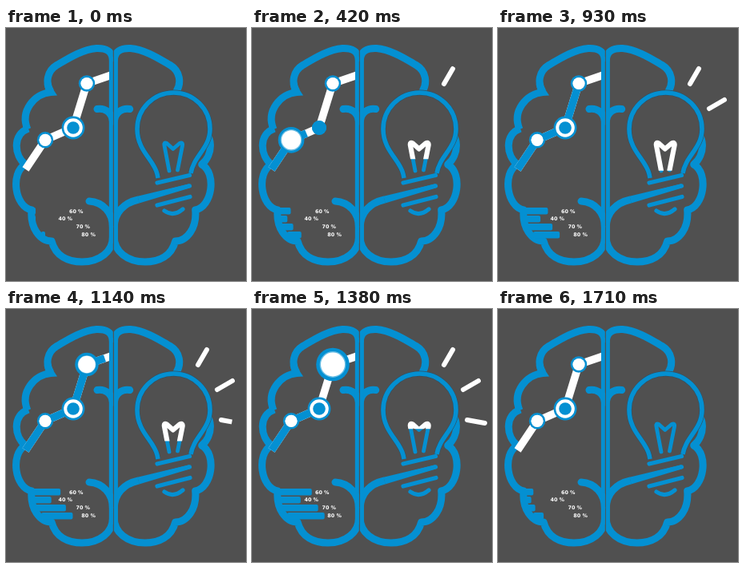
An HTML page for the animation above (1740 ms loop, 300 by 317 pixels).

```html
<!DOCTYPE html>
<html lang="en">
<head>
<meta charset="utf-8">
<title>Brain and bulb</title>
<style>
  html, body { margin: 0; width: 100%; height: 100%; overflow: hidden; background: #505050; }
  svg { display: block; width: 100vw; height: 100vh; }
  .line { fill: none; stroke: #0490d2; stroke-width: 9; stroke-linejoin: round; }
  .round { stroke-linecap: round; }
  .sharp { stroke-linejoin: miter; }
  .thin { stroke-width: 5.2; }
  .white { stroke: #fff; }
  .edge { stroke: #34505f; stroke-width: 6.8; }
  .blue { fill: #0490d2; }
  text { font: 700 6.4px "DejaVu Sans", Inter, sans-serif; fill: #fff; }
</style>
</head>
<body>
<svg viewBox="0 0 300 317">
  <defs>
    <clipPath id="half"><rect width="133.8" height="317"/></clipPath>
    <clipPath id="trendClip"><rect width="129" height="317"/></clipPath>
    <clipPath id="glowClip"><rect id="glow" x="185" y="130" width="50" height="0"/></clipPath>
    <g id="lobes" class="line">
      <path d="M133.500 42C133.500 29 125 25 113 25.500C95 27 78 38 63.500 46.500C51 54 49 69 56 80"/>
      <path d="M28 126C8 133 10 159 24 171C5 182 11 224 32 228C30 250 42 267 57 267C62 286 78 293 95 293C117 293 133.500 280 133.500 262V248"/>
      <path class="round" d="M114 101.500C123 100 132 105 133.500 117"/>
      <path class="thin" d="M131.400 36V270"/>
    </g>
    <path id="filament" d="M204 179L198 147.500Q197 142.500 201 144.500L208.800 151.500L217 144.500Q221.500 142.500 220.500 147.500L214.500 178"/>
    <path id="bulb" d="M190 188L189 183C185 165 164 154 164 126.500A45.500 45.500 0 0 1 255 126.500C255 151 234.500 160 231 182"/>
  </defs>

  <g clip-path="url(#half)">
    <use href="#lobes"/>
    <g class="line">
      <path class="sharp" d="M52 70Q53 76 56 80.500C36 82 17 104 27 127"/>
      <path class="round" d="M133.500 250C133.500 231 121 218 104 217"/>
    </g>
  </g>
  <g transform="translate(268.7) scale(-1 1)">
    <g clip-path="url(#half)">
      <use href="#lobes"/>
      <path class="line" d="M133.500 250C133.500 231 121 219 103 215"/>
    </g>
  </g>
  <g clip-path="url(#trendClip)" id="trend"></g>

  <use href="#bulb" class="line edge" style="fill:#505050"/>
  <use href="#bulb" class="line" style="stroke-width:5.6"/>
  <path class="blue" d="M164.500 210.700L229 195.300L230.500 200.300L166.500 219.500Z"/>
  <g class="line round thin">
    <path d="M189 194L229.500 184.500M190 208L229.500 197.800M189 222L230 211.500M198 229Q209 237 221 227"/>
    <use href="#filament" style="stroke-width:4.800"/>
  </g>
  <g clip-path="url(#glowClip)">
    <use href="#filament" class="line round white" style="stroke-width:6.200"/>
  </g>

  <g id="rays"></g>
  <g id="bars" class="blue"></g>
  <g id="nodes"></g>
  <text x="79" y="232">60 %</text>
  <text x="65.500" y="241.300">40 %</text>
  <text x="87.500" y="251.300">70 %</text>
  <text x="94.300" y="261.300">80 %</text>
</svg>
<script>
const LOOP = 1740, STEP = 30;
const $ = id => document.getElementById(id);

function add(parent, tag, attrs) {
  const el = document.createElementNS("http://www.w3.org/2000/svg", tag);
  set(el, attrs);
  parent.appendChild(el);
  return el;
}
function set(el, attrs) {
  for (const key in attrs) el.setAttribute(key, attrs[key]);
}
// Linear interpolation through [time, value] pairs
function along(t, keys) {
  if (t <= keys[0][0]) return keys[0][1];
  for (let i = 1; i < keys.length; i++) {
    const [a, u] = keys[i - 1], [b, v] = keys[i];
    if (t <= b) return u + (v - u) * (t - a) / (b - a);
  }
  return keys[keys.length - 1][1];
}
function pulse(t, from, to) {
  return t > from && t < to ? Math.sin(Math.PI * (t - from) / (to - from)) : 0;
}

const trendPath = "M24.5 177L49 140.3L84 125L101 69.5L133 58.5";
const trendLine = cls => add($("trend"), "path",
  { class: "line sharp " + cls, d: trendPath, style: "stroke-width:9.6" });
trendLine("white");
const trendFill = trendLine("");

const bars = [
  { y: 225, x: 32, from: 37, to: 75 },
  { y: 235, x: 33, from: 37, to: 61 },
  { y: 245, x: 36, from: 38, to: 83 },
  { y: 255, x: 44, from: 49, to: 91 }
].map(b => ({ ...b, el: add($("bars"), "rect", { x: b.x, y: b.y, height: 8.4, rx: 2 }) }));

const rays = [
  { a: [240, 70], b: [251, 51], grow: [45, 430], shrink: [1590, 1705] },
  { a: [264, 101], b: [283, 90], grow: [425, 770], shrink: [1575, 1700] },
  { a: [269, 139], b: [291, 143], grow: [930, 1290], shrink: [1545, 1690] }
].map((r, i) => {
  const dx = r.b[0] - r.a[0], dy = r.b[1] - r.a[1], len = Math.hypot(dx, dy);
  const turn = Math.atan2(dy, dx) * 180 / Math.PI;
  const g = add($("rays"), "g", { transform: `translate(${r.a}) rotate(${turn})` });
  const clip = add(g, "clipPath", { id: "ray" + i });
  const el = add(clip, "rect", { x: -3.5, y: -4, height: 8 });
  add(g, "path", { class: "line round white", d: `M0 0H${len}`,
    style: "stroke-width:6", "clip-path": `url(#ray${i})` });
  return { ...r, el, full: len + 7 };
});

function node(x, y) {
  const disc = attrs => add($("nodes"), "circle", { cx: x, cy: y, ...attrs });
  return {
    outer: disc({ class: "blue" }),
    halo: disc({ fill: "#fff", opacity: 0.4 }),
    white: disc({ fill: "#fff" }),
    core: disc({ class: "blue", r: 0 })
  };
}
const low = node(49, 140.3), mid = node(84, 125), high = node(101, 69.5);

function swell(n, k, growth, whiteGrowth) {
  set(n.outer, { r: 10.2 + growth * k });
  set(n.white, { r: 7.6 + whiteGrowth * k });
  set(n.halo, { r: 7.6 + (whiteGrowth + 1.4) * k });
}

function draw(t) {
  const done = along(t, [[0, 7], [1190, 171], [1380, 83], [1620, 20], [1700, 0]]);
  set(trendFill, { "stroke-dasharray": `${done} 400`,
    visibility: done > 0 && t > 0 ? "visible" : "hidden" });

  const fill = along(t, [[0, 0], [1390, 1], [1583, 1], [LOOP, 0]]);
  for (const b of bars) set(b.el, { width: b.from + (b.to - b.from) * fill - b.x });

  for (const r of rays) {
    const k = along(t, [[r.grow[0], 0], [r.grow[1], 1], [r.shrink[0], 1], [r.shrink[1], 0]]);
    set(r.el, { width: r.full * k });
  }

  set($("glow"), { height: along(t, [[0, 9], [800, 57], [1560, 9]]) });

  swell(low, pulse(t, 60, 640), 6.6, 4.8);
  swell(high, pulse(t, 1050, 1690), 10.6, 7.4);

  set(mid.outer, { r: along(t, [[0, 14.4], [210, 10.4], [420, 9], [530, 9], [640, 14.4]]) });
  set(mid.white, { r: along(t, [[0, 11.8], [210, 8.8], [330, 7], [530, 7], [640, 11.8]]) });
  set(mid.core, { r: along(t, [[0, 7.8], [210, 8.6], [420, 9], [530, 9], [640, 7.8]]) });
}

const start = performance.now();
function tick() {
  const t = (performance.now() - start) % LOOP;
  draw(Math.floor(t / STEP) * STEP);
  requestAnimationFrame(tick);
}
draw(0);
tick();
</script>
</body>
</html>
```
